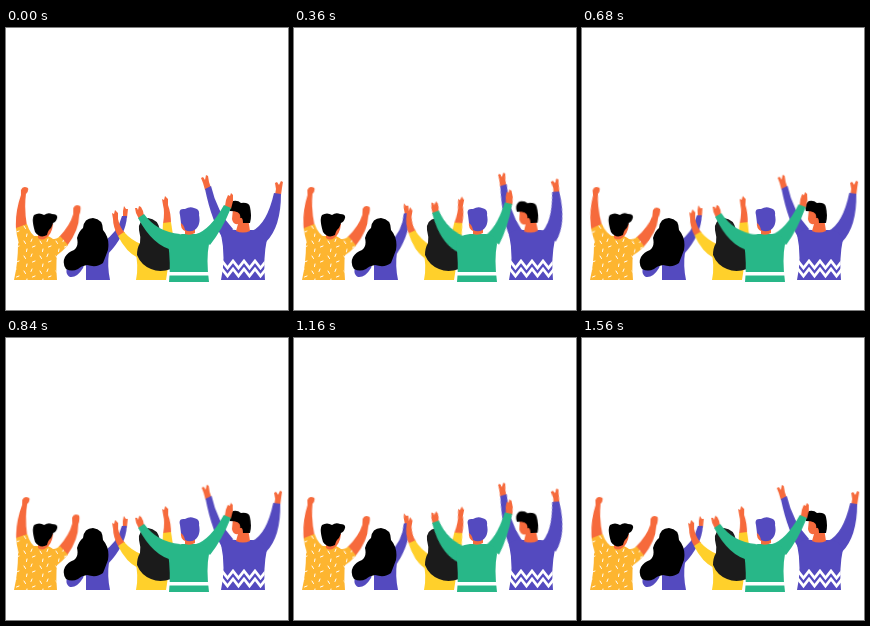
Recreate the animation shown at these times as an HTML page without scripts. Size 282 by 282 pixels, loop 1600 ms.

```html
<!DOCTYPE html>
<html lang="en">
<head>
<meta charset="utf-8">
<title>Cheering crowd</title>
<style>
  html, body { margin: 0; width: 100%; height: 100%; overflow: hidden; background: #fff; }
  svg { display: block; width: 100vw; height: 100vh; }

  .skin { fill: #f66a3c; }
  .amber { fill: #fdb530; }
  .lemon { fill: #ffd02b; }
  .violet { fill: #544abf; }
  .green { fill: #28b788; }
  .ink { fill: #000; }
  .soft-ink { fill: #1b1b1b; }
  .trim { fill: none; stroke: #fff; stroke-width: 2.8; }

  /* Each moving part swings from --a to --b around its joint --o. */
  .swing {
    transform-origin: var(--o);
    animation: swing 400ms cubic-bezier(.37, 0, .63, 1) var(--delay, 0ms) infinite alternate;
  }
  @keyframes swing {
    from { transform: rotate(var(--a)); }
    to { transform: rotate(var(--b)); }
  }
</style>
</head>
<body>
<svg viewBox="0 0 282 282" role="img" aria-label="Five friends seen from behind, waving their arms">
  <defs>
    <pattern id="flecks" width="16" height="15" patternUnits="userSpaceOnUse">
      <path d="M2 3l1.5 2.5M10 1l-1 2.5M13 8l-2.5 1M5 11l-.5 2.5" stroke="#fff" stroke-linecap="round"/>
    </pattern>
    <clipPath id="sweater"><path d="M217 225H258L260 252H215Z"/></clipPath>
    <path id="boy-torso" d="M8 252Q12 235 12 216Q16 207 30 208H42Q50 212 53 217Q49 230 51 252Z"/>
    <path id="boy-sleeve-l" d="M10 200L21 196Q24 206 31 210L18 226Q11 215 10 200Z"/>
    <path id="boy-sleeve-r" d="M43 211Q50 212 54 208L62 217Q56 224 50 228L42 220Z"/>
  </defs>

  <!-- Boy in the flecked shirt -->
  <g style="--delay:-240ms">
    <g class="swing" style="--o:17px 208px;--a:-8deg;--b:4deg">
      <path class="skin" d="M10 201Q9 184 15 167L15 162Q17 157 22 160Q23 163 20 166Q18 181 21 198Z"/>
      <use href="#boy-sleeve-l" class="amber"/>
      <use href="#boy-sleeve-l" fill="url(#flecks)"/>
    </g>
    <g class="swing" style="--o:46px 221px;--a:8deg;--b:-3.5deg">
      <path class="skin" d="M53 209Q64 197 67 186V180Q69 175 74 178Q75 182 73 187Q73 202 61 218Z"/>
      <use href="#boy-sleeve-r" class="amber"/>
      <use href="#boy-sleeve-r" fill="url(#flecks)"/>
    </g>
    <use href="#boy-torso" class="amber"/>
    <use href="#boy-torso" fill="url(#flecks)"/>
    <g class="swing" style="--o:36px 209px;--a:-1deg;--b:1deg">
      <path class="skin" d="M32 204V210Q36 213 40 210Q46 206 47 196L42 194Z"/>
      <path class="ink" d="M29 204Q25 191 28 187Q33 184 38 187Q42 184 46 186Q52 186 51 190Q50 194 47 195Q46 198 45 200Q42 202 41 207Q34 211 29 204Z"/>
    </g>
  </g>

  <!-- Girl in violet -->
  <g class="violet">
    <path d="M61 240Q59 246 64 249Q71 250 77 240L82 226L70 228Z"/>
    <path d="M80 224L98 211L103 224Q101 238 104 252H80Z"/>
    <g class="swing" style="--o:100px 220px;--a:0deg;--b:-11deg">
      <path class="skin" d="M117 190L117 183L118 178L120 181L122 181L121 190Z"/>
      <path d="M97 214Q112 204 116 188L121 188Q120 207 102 226Z"/>
    </g>
    <path class="ink" d="M77 200Q78 190 87 190Q97 191 97 202Q104 210 102 222Q99 230 97 235Q91 240 81 237Q75 238 72 241Q66 244 60 241Q56 235 59 229Q62 224 68 222Q73 218 71 210Q73 203 77 200Z"/>
  </g>

  <!-- Girl in yellow -->
  <g class="lemon">
    <g class="swing" style="--o:161px 211px;--a:0deg;--b:12deg">
      <path class="skin" d="M157 196Q159 184 157 177L156 171L158 172L159 168L162 171L162 177Q165 185 165 196Z"/>
      <path d="M157 195L165 194L168 214H156Z"/>
    </g>
    <path d="M129 221L145 212L165 220L160 252H130Q133 238 129 221Z"/>
    <g class="swing" style="--o:129px 222px;--a:0deg;--b:10deg">
      <path class="skin" d="M112 208Q107 199 107 191L106 185L108 186L109 182L112 185L112 191Q114 200 119 205Z"/>
      <path d="M112 208L118 204Q125 212 135 216L132 230Q120 224 112 208Z"/>
    </g>
    <path class="soft-ink" d="M133 202Q132 192 142 190Q152 191 154 202L170 225L165 241Q154 245 145 241Q135 237 131 227Q131 220 134 215Q135 209 133 202Z"/>
  </g>

  <!-- Man in the zigzag sweater -->
  <g class="violet" style="--delay:-40ms">
    <g class="swing" style="--o:221px 206px;--a:-.2deg;--b:9deg">
      <path class="skin" d="M199 162L197 155L195 150L197 149L199 152L200 147L202 148L203 154L205 160Z"/>
      <path d="M199 161L205 158Q211 184 227 201L219 214Q206 195 199 161Z"/>
    </g>
    <g class="swing" style="--o:259px 206px;--a:.3deg;--b:-13.5deg">
      <path class="skin" d="M269 167L270 161L269 155L271 154L273 157L275 153L277 154L276 160L275 167Z"/>
      <path d="M268 165L275 166Q275 199 260 214L246 203Q261 196 268 165Z"/>
    </g>
    <path d="M215 252Q220 230 215 206Q220 201 230 202H246Q258 202 261 211Q257 230 259 252Z"/>
    <g class="trim" clip-path="url(#sweater)">
      <path id="zigzag" d="M205 233l5.5 7l5.5-7l5.5 7l5.5-7l5.5 7l5.5-7l5.5 7l5.5-7l5.5 7l5.5-7"/>
      <use href="#zigzag" y="8"/>
    </g>
    <g class="swing" style="--o:238px 204px;--a:0deg;--b:-3deg">
      <path class="skin" d="M227 181L226 191Q227 197 232 196L230 203Q237 206 244 203L242 190L236 181Z"/>
      <path class="ink" d="M224 183Q222 176 227 173Q232 172 235 175Q243 174 244 179Q246 188 244 195L237 195Q237 189 234 190Q236 183 224 183Z"/>
    </g>
  </g>

  <!-- Friend in green -->
  <g class="green">
    <g class="swing" style="--o:156px 213px;--a:0deg;--b:14deg">
      <path class="skin" d="M133 191L130 185L129 180L131 180L132 182L133 178L135 179L137 183L138 188Z"/>
      <path d="M132 190L138 186Q151 204 174 206L167 222Q147 218 132 190Z"/>
    </g>
    <g class="swing" style="--o:202px 211px;--a:0deg;--b:-12deg">
      <path class="skin" d="M219 178L220 172L222 167L224 168L225 165L227 167L227 173L225 181Z"/>
      <path d="M218 177L225 180Q216 202 204 217L190 206Q204 202 218 177Z"/>
    </g>
    <path d="M163 254Q165 236 162 214Q164 207 176 206H192Q202 207 203 216Q200 231 203 254Z"/>
    <path class="trim" style="stroke-width:3.4" d="M162 245.8H204"/>
    <path class="skin" d="M175 193Q174 201 179 203V206Q184 208 189 205V198Z"/>
    <path class="violet" d="M174 187Q172 180 179 181Q184 178 188 180Q194 181 193 187Q195 196 190 201Q185 205 179 202Q178 197 175 195Z"/>
  </g>
</svg>
</body>
</html>
```
